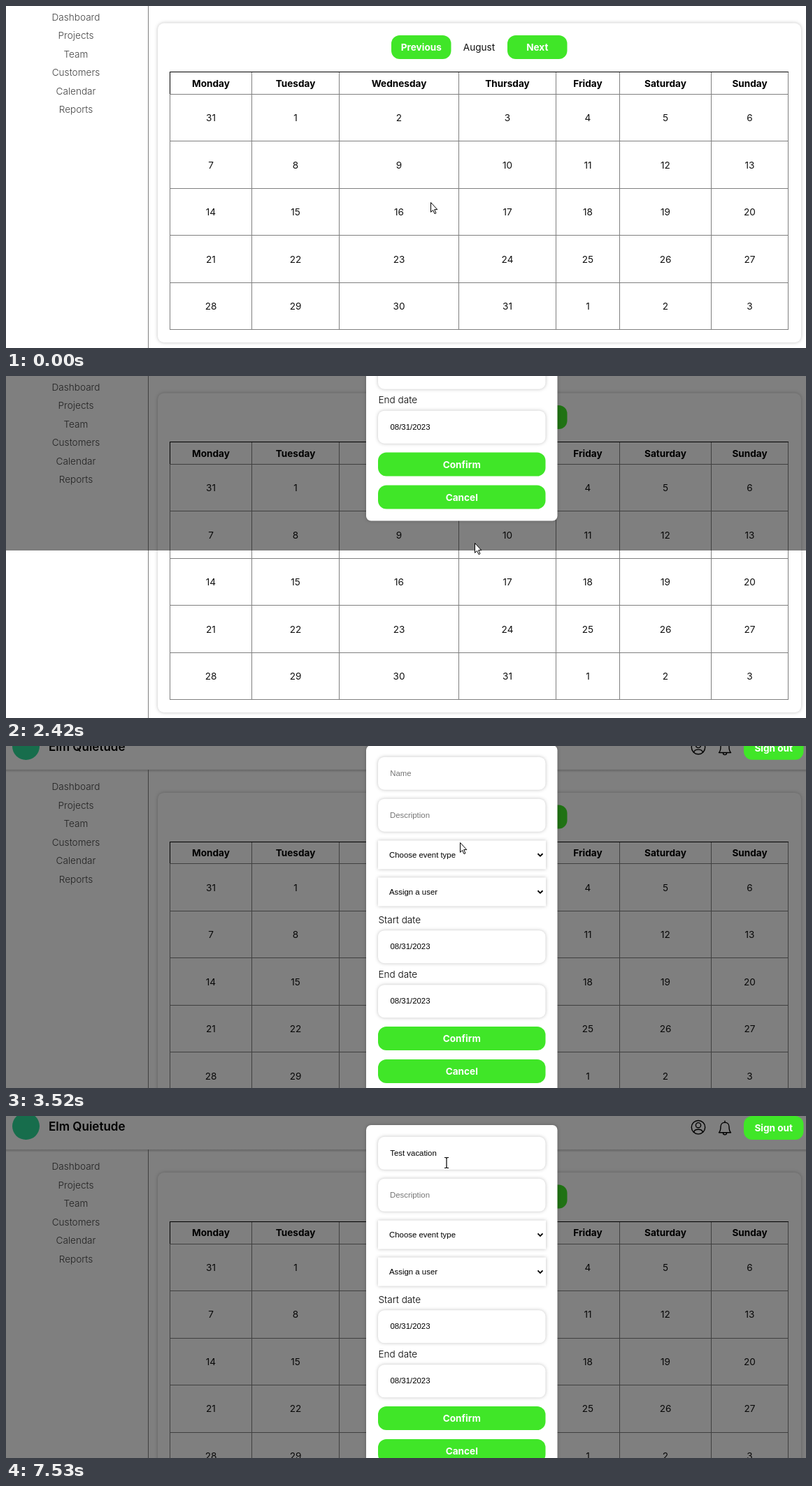
An HTML page for the animation above (7990 ms loop, 1144 px wide and 490 px high).

```html
<!DOCTYPE html>
<html lang="en">
<head>
<meta charset="utf-8">
<title>Calendar event form</title>
<style>
html, body { margin: 0; width: 100%; height: 100%; overflow: hidden; background: #fff; }
svg { display: block; width: 1144px; height: 490px; }
text { font: 400 13.6px Inter, sans-serif; fill: #111; white-space: pre; }
.mid { text-anchor: middle; }
.nav { font-weight: 300; fill: #444; }
.bold { font-weight: 700; fill: #000; }
.label { font-weight: 300; fill: #000; }
.brand { font-weight: 600; font-size: 17px; fill: #000; }
.white { font-weight: 700; fill: #fff; }
.input { font: 11.4px "Liberation Sans", Arial, sans-serif; fill: #000; }
.hint { fill: #757575; }
.green { fill: #40e628; }
.card { fill: #fff; filter: drop-shadow(0 0 2.5px rgba(0,0,0,.25)); }
.line { fill: #808080; shape-rendering: crispEdges; }
.dark { fill: #000; }
.ink { fill: none; stroke: #000; stroke-width: 1.4; stroke-linecap: round; stroke-linejoin: round; }
</style>
</head>
<body>
<svg viewBox="0 0 1144 490" xmlns="http://www.w3.org/2000/svg">
  <g id="view">
    <g id="page"></g>
    <g id="slide">
      <rect x="0" y="-60" width="1144" height="560" fill="#000" fill-opacity=".5"/>
    </g>
    <g id="signout"></g>
    <g id="modal"></g>
  </g>
  <path id="arrow" d="M.5 .5V14.3L3.6 11.4L6 16.6L8 15.7L5.7 10.6H9.8Z" fill="#fff" stroke="#000" stroke-width="1"/>
  <path id="beam" d="M-3 -7.5H-1L0 -6.5L1 -7.5H3M0 -6.5V6.5M-3 7.5H-1L0 6.5L1 7.5H3" fill="none" stroke="#000" stroke-width="1.2"/>
</svg>
<script>
const LOOP = 7990, SCROLL = 56.6;
const $ = id => document.getElementById(id);

// Text is placed by the vertical centre of its capitals
const text = (x, y, str, cls) =>
  `<text x="${x}" y="${y + (cls.includes('input') ? 4.1 : 4.95)}" class="${cls}">${str}</text>`;
const rect = (x, y, w, h, cls, r = 0) =>
  `<rect x="${x}" y="${y}" width="${w}" height="${h}" rx="${r}" class="${cls}"/>`;
const button = (x, y, w, str) =>
  rect(x, y, w, 34, 'green', 12) + text(x + w / 2, y + 17.2, str, 'mid white');

function header() {
  return `<defs><linearGradient id="shade" x2="0" y2="1">
      <stop stop-color="#000" stop-opacity=".2"/><stop offset="1" stop-color="#000" stop-opacity="0"/>
    </linearGradient></defs>
    <rect x="0" y="-8.6" width="1144" height="4" fill="url(#shade)"/>
    <circle cx="28.5" cy="-42" r="19.5" fill="#2fdc9a"/>` +
    text(61, -38.9 - 1.2, 'Elm Quietude', 'brand') +
    `<g class="ink" transform="translate(990 -40.4)">
      <circle r="9.7"/><circle cy="-3" r="3.6"/><path d="M-6.5 7C-5 1.8 5 1.8 6.5 7"/>
    </g>
    <g class="ink" transform="translate(1028 -39.4)">
      <path d="M-8.5 6.5C-6 4 -6 1 -6 -2C-6 -10 6 -10 6 -2C6 1 6 4 8.5 6.5ZM0 -8V-10M-2.5 7C-2.5 10.5 2.5 10.5 2.5 7"/>
    </g>`;
}

function calendar() {
  const days = ['Monday', 'Tuesday', 'Wednesday', 'Thursday', 'Friday', 'Saturday', 'Sunday'];
  const cols = [234, 351, 476, 647, 786, 877, 1008, 1118];
  const top = 94.2, head = 125.9, pitch = 67.5;
  let out = rect(217, 24.5, 920, 457.5, 'card', 9) +
    button(551, 42, 85.5, 'Previous') + text(676.5, 59.2, 'August', 'mid') +
    button(717, 42, 85.5, 'Next');
  cols.forEach(x => out += rect(x, top, 1, head + 5 * pitch - top + 1, 'line'));
  for (let r = 0; r < 6; r++) out += rect(234, head + r * pitch, 885, 1, 'line');
  out += rect(234, top, 885, 1, 'line dark') + rect(234, top, 1, head - top, 'line dark');
  days.forEach((day, c) => {
    const x = (cols[c] + cols[c + 1] + 1) / 2;
    out += text(x, 110.9, day, 'mid bold');
    for (let r = 0; r < 5; r++) {
      const n = (r * 7 + c + 30) % 31 + 1;
      out += text(x, 160.2 + r * pitch, n, 'mid');
    }
  });
  return out;
}

function sidebar() {
  const items = ['Dashboard', 'Projects', 'Team', 'Customers', 'Calendar', 'Reports'];
  return rect(203, -8.6, 1, 600, 'line') +
    items.map((s, i) => text(100, 15.8 + i * 26.5, s, 'mid nav')).join('');
}

function form() {
  const field = y => rect(532, y, 239.5, 47, 'card', 9);
  const select = (y, str) => rect(532, y, 240, 41, 'card') +
    text(548, y + 20.4, str, 'input') +
    `<path d="M760.5 ${y + 18.8}l3.5 3.5l3.5 -3.5" fill="none" stroke="#000" stroke-width="1.8"/>`;
  const date = (y, str) => text(532.5, y, str, 'label') + field(y + 15.5) +
    text(549.5, y + 38.6, '08/31/2023', 'input');
  return rect(515, -43.6, 273.5, 501.2, 'card', 7) +
    field(-26.8) + text(549.3, -3.4, 'Name', 'input hint').replace('<text', '<text id="name"') +
    '<rect id="caret" y="-9.6" width="1" height="13" fill="#000"/>' +
    field(33.2) + text(549, 56.8, 'Description', 'input hint') +
    select(93, 'Choose event type') + select(146, 'Assign a user') +
    date(206.2, 'Start date') + date(284.2, 'End date') +
    button(532, 359.5, 239.5, 'Confirm') + button(532, 406.5, 239.5, 'Cancel');
}

$('page').innerHTML = header() + sidebar() + calendar();
$('signout').innerHTML = button(1055, -56.6, 85.5, 'Sign out');
$('modal').innerHTML = form();

const PHRASE = 'Test vacation';
const KEYS = [4670, 4930, 5120, 5340, 5470, 5600, 5860, 6070, 6260, 6590, 6690, 6790, 6990];
const clamp = v => Math.min(1, Math.max(0, v));
const mix = (a, b, p) => a + (b - a) * p;

// Fraction of n evenly timed steps done, the first at a and the last at b
const steps = (t, a, b, n) => t < a ? 0 : clamp((Math.floor((t - a) / (b - a) * (n - 1) + 1e-6) + 1) / n);

// CSS "ease" curve
function ease(x) {
  let lo = 0, hi = 1;
  for (let i = 0; i < 24; i++) {
    const m = (lo + hi) / 2;
    if (.75 * m - .75 * m * m + m ** 3 < x) lo = m; else hi = m;
  }
  return .3 * (1 - lo) ** 2 * lo + 3 * (1 - lo) * lo * lo + lo ** 3;
}

function slideY(t) {
  if (t < 2350) return -500;
  const held = 2350 + Math.floor((t - 2350) / 70) * 70;
  return Math.round(-500 * (1 - ease(clamp((held - 2332) / 300))));
}

function pointer(t) {
  const go = (a, b, p) => [mix(a[0], b[0], p), mix(a[1], b[1], p)].map(Math.round);
  const rest = [607, 281], cell = [670, 239], list = [649, 138], box = [634, 67];
  if (t < 2890) {
    const p = steps(t, 1170, 1650, 7);
    return go(rest, cell, p * p * (3 - 2 * p));
  }
  if (t < 3720) return go(cell, list, steps(t, 2890, 2960, 2));
  if (t < 4270) return go(list, box, steps(t, 3720, 4070, 6));
  return [630, 67];
}

function draw(t) {
  const scroll = SCROLL * (1 - (1 - steps(t, 3450, 3660, 4)) ** 2);
  $('view').setAttribute('transform', `translate(0 ${scroll})`);
  const y = `translate(0 ${slideY(t)})`;
  $('slide').setAttribute('transform', y);
  $('modal').setAttribute('transform', y);

  const typed = KEYS.filter(k => t >= k).length;
  const name = $('name');
  name.textContent = typed ? PHRASE.slice(0, typed) : 'Name';
  name.classList.toggle('hint', !typed);
  const since = t - (typed ? KEYS[typed - 1] : 4330);
  const caret = $('caret');
  caret.setAttribute('x', Math.round(549 + (typed ? name.getComputedTextLength() : 0)));
  caret.style.display = since >= 0 && since % 1080 < 540 ? '' : 'none';

  const [px, py] = pointer(t);
  const overText = t >= 3720 && (py > 30 && py < 77 || py > 90 && py < 137);
  $('arrow').style.display = overText ? 'none' : '';
  $('beam').style.display = overText ? '' : 'none';
  $(overText ? 'beam' : 'arrow').setAttribute('transform', `translate(${px} ${py})`);
}

function tick() {
  draw(performance.now() % LOOP);
  requestAnimationFrame(tick);
}
tick();
</script>
</body>
</html>
```
